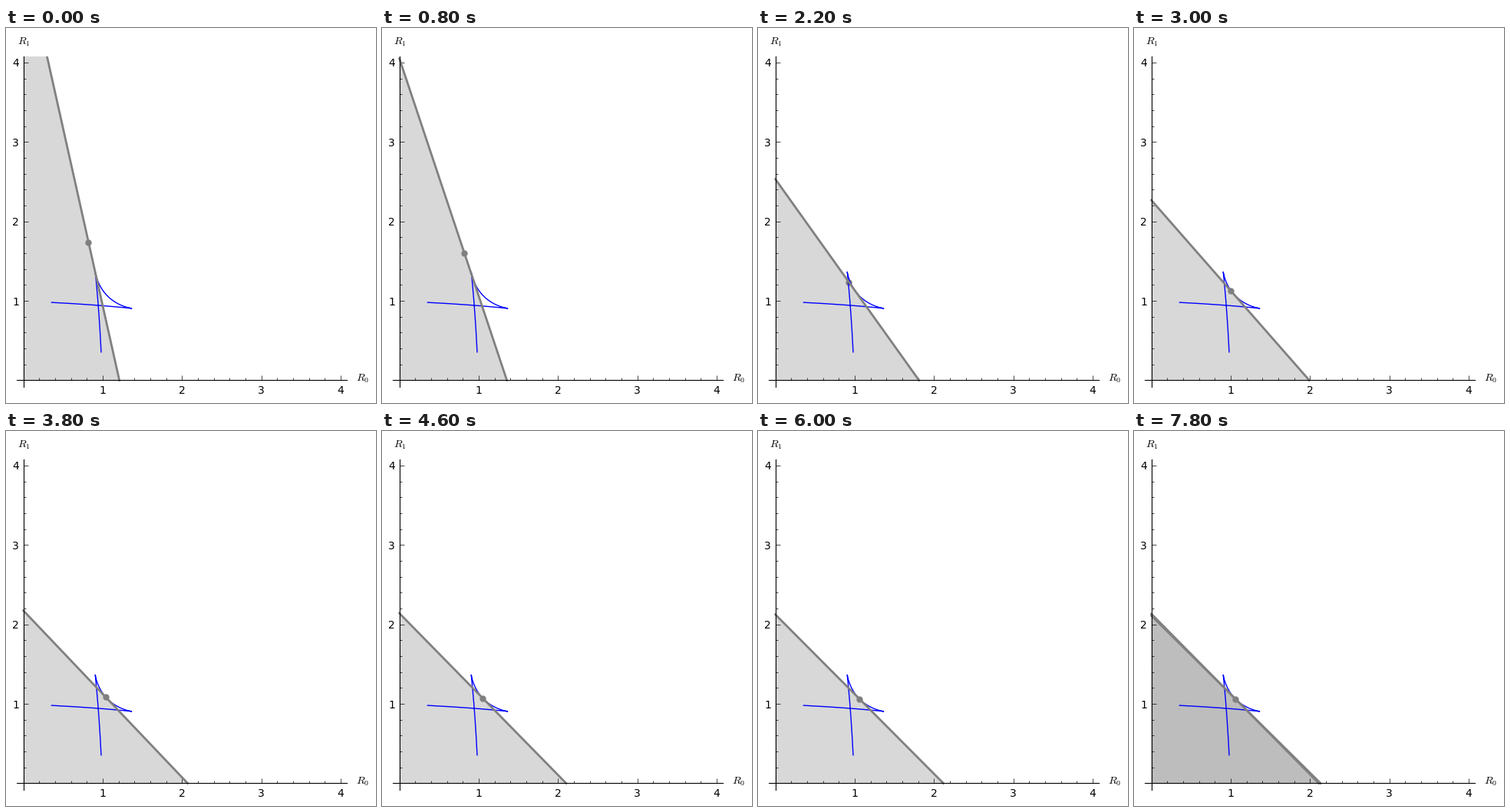
These frames come from a looping animation (482x488 px, 8000 ms). A matplotlib script:

```python
import numpy as np
import matplotlib.pyplot as plt
from matplotlib.animation import FuncAnimation

W, H, DPI = 482, 488, 100
FRAMES, STEP_MS = 40, 200
BRANCH = 32          # step at which the population splits in two
S0, CURV, CUSP = 0.943, 0.186, 0.816

plt.rcParams.update({
    "font.family": "DejaVu Sans",
    "font.size": 10,
    "mathtext.fontset": "cm",
    "lines.solid_capstyle": "projecting",
})


def total(d):
    """Summed uptake of a consumer whose two uptake rates differ by d."""
    return S0 + CURV * d**2 * (1 - d**2 / (6 * CUSP**2))


def total_slope(d):
    return 2 * CURV * d * (1 - d**2 / (3 * CUSP**2))


def intercepts(d):
    return 2 / (total(d) + d), 2 / (total(d) - d)


def resource_point(d):
    q = -d * (1.07 - 0.55 * abs(d))
    p = (1 - d * q) / total(d)
    return p + q, p - q


def envelope():
    """Swallowtail: two legs joined by the curve between the cusps."""
    d = np.linspace(CUSP, -CUSP, 120)
    p = 1 / (total(d) - d * total_slope(d))
    q = -total_slope(d) * p
    x, y = p + q, p - q
    t = np.linspace(0, 1, 40)
    leg_x = 0.98 * (1 - t)**2 + 2 * 0.951 * t * (1 - t) + x[0] * t**2
    leg_y = 0.355 * (1 - t)**2 + 2 * 0.929 * t * (1 - t) + y[0] * t**2
    return (np.concatenate([leg_x, x, leg_y[::-1]]),
            np.concatenate([leg_y, y, leg_x[::-1]]))


def trait_path(start=0.642, rate=0.245, sub=20):
    d, path = start, []
    for _ in range(FRAMES):
        path.append(d)
        for _ in range(sub):
            d -= rate / sub * d * np.exp(-4 * d**2)
    return path


def traits(k):
    if k < BRANCH:
        return [PATH[k]]
    e = 0.005 * np.exp(0.25 * (k - FRAMES + 1))
    return [e, -e]


PATH = trait_path()

fig = plt.figure(figsize=(W / DPI, H / DPI), dpi=DPI, facecolor="white")
ax = fig.add_axes([14.4 / W, 1 - 466.7 / H, 430 / W, 430 / H])
ax.set_xlim(-0.08, 4.08)
ax.set_ylim(-0.08, 4.08)
ax.patch.set_visible(False)

for side in ("top", "right"):
    ax.spines[side].set_visible(False)
for side in ("left", "bottom"):
    ax.spines[side].set_position("zero")
    ax.spines[side].set_linewidth(0.8)
for axis, pad in ((ax.xaxis, 5), (ax.yaxis, 4)):
    axis.set_ticks([1, 2, 3, 4], labels=["1", "2", "3", "4"])
    axis.set_ticks(np.arange(1, 21) / 5, minor=True)
    axis.set_tick_params(which="major", direction="in", length=4, width=0.5,
                         pad=pad)
    axis.set_tick_params(which="minor", direction="in", length=2, width=0.5)

for label, x, y in (("$R_0$", 465, 456), ("$R_1$", 23.5, 18.5)):
    fig.text(x / W, 1 - y / H, label, ha="center", va="center")

dot, = ax.plot([], [], "o", color="gray", ms=5, zorder=1.5)
ax.plot(*envelope(), color="blue", lw=1, zorder=2)
fills = [ax.fill([0, 0, 0], [0, 0, 0], color="gray", alpha=0.3, lw=0,
                 zorder=1)[0] for _ in range(2)]
lines = [ax.plot([], [], color="gray", lw=2, zorder=2.1)[0] for _ in range(2)]


def draw(k):
    ds = traits(k)
    for i, (fill, line) in enumerate(zip(fills, lines)):
        shown = i < len(ds)
        fill.set_visible(shown)
        line.set_visible(shown)
        if shown:
            a, b = intercepts(ds[i])
            fill.set_xy([(0, 0), (0, b), (a, 0)])
            line.set_data([0, a], [b, 0])
    x, y = resource_point(ds[0] if len(ds) == 1 else 0)
    dot.set_data([x], [y])
    return [*fills, *lines, dot]


anim = FuncAnimation(fig, draw, frames=FRAMES, interval=STEP_MS,
                     init_func=lambda: draw(0), repeat=True, repeat_delay=0)
plt.show()
```
